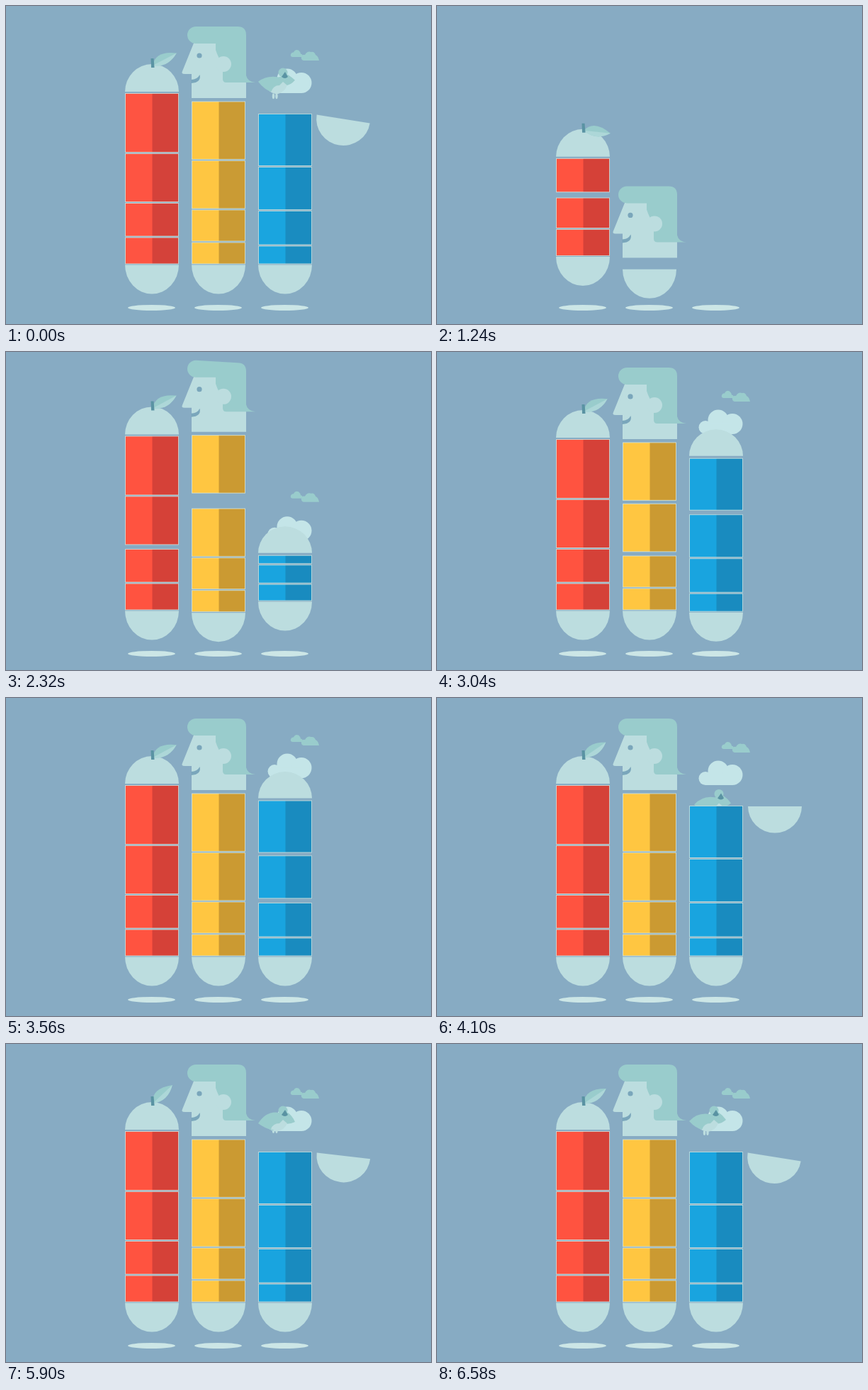
An HTML page with a canvas for the animation above (6.6 s loop, 600 by 449 pixels).

```html
<!DOCTYPE html>
<html lang="en">
<head>
<meta charset="utf-8">
<title>Growing capsules</title>
<style>
  html, body { margin: 0; width: 100%; height: 100%; overflow: hidden; background: #87abc3; }
  canvas { display: block; width: 100%; height: 100%; }
</style>
</head>
<body>
<canvas id="stage" width="600" height="449"></canvas>
<script>
const ctx = document.getElementById('stage').getContext('2d');
const LOOP = 6600, FADE = 120, START = 360, STAGGER = 560;
const BG = '#87abc3', LIGHT = '#bcdddf', TEAL = '#99cccc', PALE = '#c4e5e8', DARK = '#5a93a3', FACE = '#7aa6bb';

// Segments are listed from bottom to top.
const pills = [
  { x: 168, a: '#ff5340', b: '#d54138', h: [37, 46.5, 68, 83], gap: 2.5, cap: apple },
  { x: 262, a: '#ffc641', b: '#cb9a32', h: [30, 44, 67.5, 81.5], gap: 5, cap: head },
  { x: 356, a: '#19a4df', b: '#198bbf', h: [25, 47.5, 60, 73], gap: 3.5, cap: lid }
];
const grow = [[690, 855], [785, 890], [826, 905], [890, 1000]];

const clamp = u => Math.max(0, Math.min(1, u));
const ramp = (t, a, b) => clamp((t - a) / (b - a));
const smooth = u => u * u * (3 - 2 * u);
const hop = (t, a, b, h) => { const u = ramp(t, a, b); return 4 * h * u * (1 - u); };
const flutter = t => Math.sin((t - 6580) / 160 * Math.PI * 2);

function shape(d, color) {
  ctx.fillStyle = color;
  ctx.fill(new Path2D(d));
}

function oval(x, y, rx, ry, color, from = 0, to = Math.PI * 2) {
  ctx.beginPath();
  ctx.ellipse(x, y, rx, ry, 0, from, to);
  ctx.fillStyle = color;
  ctx.fill();
}

function placed(x, y, turn, draw) {
  ctx.save();
  ctx.translate(x, y);
  ctx.rotate(turn * Math.PI / 180);
  draw();
  ctx.restore();
}

const dome = (x, y, r) => oval(x, y, 38, r, LIGHT, Math.PI, Math.PI * 2);

// Offsets of the loose joints at local time p.
const joint3 = p => hop(p, 840, 960, 7) + hop(p, 1800, 2250, 5);
const joint4 = p => hop(p, 1050, 1590, 22) + hop(p, 1590, 1930, 6) + hop(p, 1980, 2260, 3);

function baseShift(p) {
  const u = ramp(p, 0, 280);
  return -430 * (1 - u * u) + hop(p, 280, 460, 9) - hop(p, 460, 640, 4)
    - hop(p, 700, 970, 13) + hop(p, 1200, 1700, 2.8);
}

function apple(y, p, t) {
  dome(206, y, 39);
  const wind = ramp(t, 3500, 3900);
  const droop = 34 * Math.exp(-(((p - 880) / 220) ** 2));
  placed(207, y - 37, -28 + droop + wind * (9 * flutter(t) - 6), () => {
    shape('M0 0Q13 -17 38 0Q18 13 0 0', TEAL);
    shape('M0 0L38 0Q18 13 0 0', '#add7d8');
  });
  shape(`M204.5 ${y - 47}h4l1 13h-4.5z`, DARK);
}

function head(y, p) {
  ctx.save();
  ctx.translate(0, y - 130);
  shape('M266 50L249 92Q247 96 252 96H262V130H339V50Z', LIGHT);
  shape('M261.5 104Q270 104 273.5 97Q276 108 261.5 109Z', FACE);
  oval(273, 70, 3.6, 3.6, FACE);
  // The hair dips at the back and its ends fly up while the head is in the air.
  const sway = hop(p, 1050, 1590, 1);
  const back = 29 + 4 * sway, end = 108 - 7 * sway;
  shape(`M268 29L327 ${back}Q339 ${back} 339 ${back + 12}V${end - 10}Q341 ${end - 1} 352 ${end}H311Q306 ${end} 306 ${end - 5}V82H296V53H268A12 12 0 0 1 268 29Z`, TEAL);
  oval(307, 82 - 2 * sway, 11, 11, LIGHT);
  shape('M296 62V82H306Q300 74 296 62Z', LIGHT);
  ctx.restore();
}

function clouds(y, p) {
  ctx.save();
  ctx.translate(0, y - 149 - hop(p, 1050, 2250, 5));
  shape('M405 72Q401 72 402 68Q403 65 406 65.5Q408 60.5 413 62.5Q416 65 416 67.5Q420 68 418 72Z', TEAL);
  shape('M420 77Q416 76 417 71Q419 68 422 69Q425 63 431 65Q435 64 437 69Q441 71 442 77Z', TEAL);
  ctx.translate(0, 9 * (1 - ramp(p, 900, 1300)));
  oval(397, 103, 14.5, 14.5, PALE);
  oval(417, 108.5, 14.5, 14.5, PALE);
  oval(379, 113.5, 9.5, 9.5, PALE);
  ctx.fillRect(379, 108, 38, 15);
  ctx.restore();
}

function lid(y, p, t) {
  const open = 180 * smooth(ramp(t, 3700, 4060)) + 9 * ramp(t, 4100, 6500);
  placed(435.5, y + 2, open, () => dome(-41.5, -2, 37.5));
}

function bird(t) {
  const rise = smooth(ramp(t, 3850, 4500));
  if (!rise) return;
  const s = flutter(t), down = 62 * (1 - rise);
  ctx.save();
  ctx.translate(down * 0.17, down);
  for (const x of [377.5, 382]) oval(x, 125 + 3 * s, 1.7, 4, LIGHT);
  const tip = 109 - 3 * s, back = 99 + 2 * s;
  shape(`M356 ${tip}Q368 ${back - 3} 385 ${back}L398 97Q404 101 408 ${tip - 2}Q400 114 391 112L377 122Q365 119 356 ${tip}`, TEAL);
  oval(391, 94, 6.5, 6.5, TEAL);
  shape(`M374 ${121 + s}Q377 112 386 112L391 107L397 112Q393 122 382 ${124 + s}Z`, LIGHT);
  shape('M389 100L394 93L398 100Q394 104 389 100', DARK);
  ctx.restore();
}

function segment(pill, y, h) {
  ctx.fillStyle = pill.a;
  ctx.fillRect(pill.x + 0.5, y, 75, h);
  ctx.fillStyle = pill.b;
  ctx.fillRect(pill.x + 38.5, y, 37, h);
  ctx.strokeStyle = 'rgba(215,232,225,.75)';
  ctx.lineWidth = 1;
  ctx.strokeRect(pill.x + 0.5, y, 75, h);
}

function drawPill(pill, i, t) {
  const p = t - START - i * STAGGER;
  if (p <= 0) return;
  const base = baseShift(p);
  oval(pill.x + 38, 365.5 + base, 38, 41, LIGHT, 0, Math.PI);
  let y = 364 + base;
  const parts = [];
  pill.h.forEach((full, k) => {
    const u = ramp(p, ...grow[k]);
    if (!u) return;
    if (k) y -= 2 * Math.min(1, u * 5);
    if (k === 2) y -= joint3(p);
    if (k === 3) y -= joint4(p);
    y -= full * u;
    parts.push([y, full * u]);
  });
  y -= pill.gap + 120 * (1 - ramp(p, 0, 350));
  if (i === 2) {
    clouds(y, p);
    bird(t);
  }
  parts.forEach(([top, h]) => segment(pill, top, h));
  pill.cap(y, p, t);
}

function scene(t) {
  pills.forEach((pill, i) => {
    const size = smooth(ramp(t, START + i * 120, START + 220 + i * 120));
    if (size) oval(pill.x + 37.5, 426, 33.5 * size, 4 * size, '#cce6e6');
  });
  pills.forEach((pill, i) => drawPill(pill, i, t));
}

function frame(now) {
  const t = now % LOOP;
  ctx.globalAlpha = 1;
  ctx.fillStyle = BG;
  ctx.fillRect(0, 0, 600, 449);
  scene(t < FADE ? t + LOOP : t);
  if (t < FADE) {
    ctx.globalAlpha = t / FADE;
    ctx.fillStyle = BG;
    ctx.fillRect(0, 0, 600, 449);
  }
}

const began = performance.now();
function tick() {
  frame(performance.now() - began);
  requestAnimationFrame(tick);
}
tick();
</script>
</body>
</html>
```
